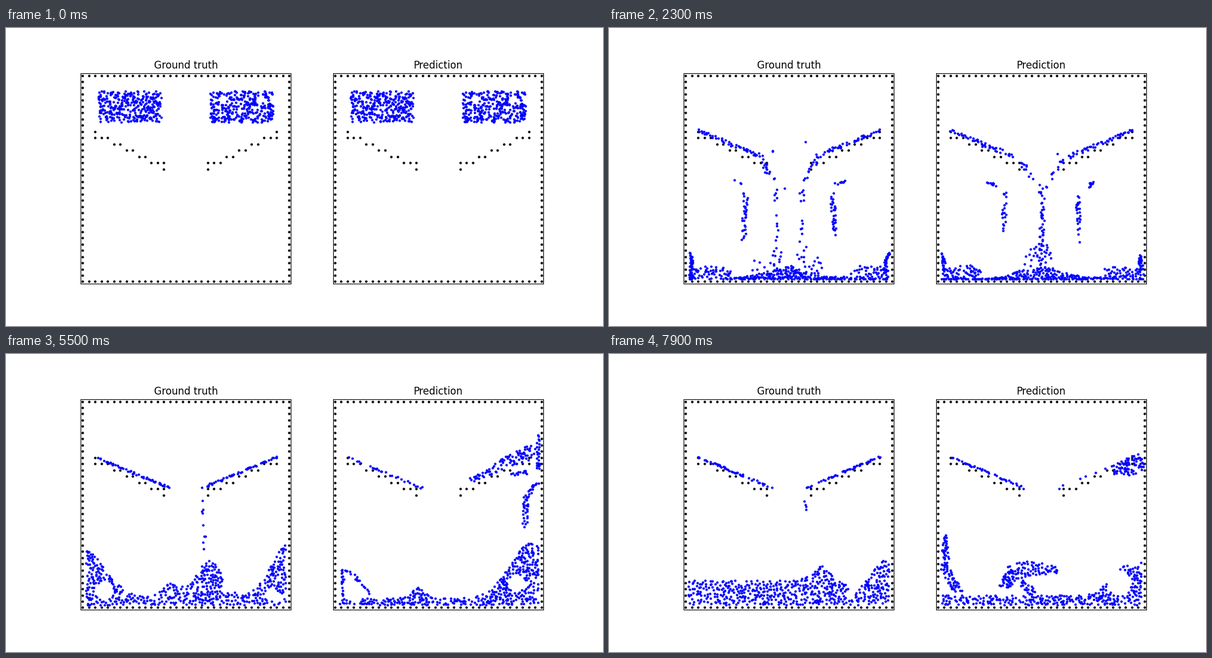
These frames come from a looping animation (1000 px wide and 500 px high, 8 s). A matplotlib script:

```python
import numpy as np
import matplotlib.pyplot as plt
from matplotlib.animation import FuncAnimation

# Lengths are in grid cells, y points up from the bottom of the box.
N = 640                 # water particles per panel
BOX = 33.6
MID = BOX / 2
GRAVITY = 52            # cells per second squared
LIP = 14.3              # where water leaves the left ramp
STEP = 100              # ms per frame
FRAMES = 80
rng = np.random.default_rng(7)


def surface(x):
    """Height of the water film on the two ramps."""
    return 18.2 + 0.425 * np.abs(x - MID)


# A shape is a particle share and the two edges of a strip.
def band(n, *v):
    """Stroke through x, y, width triples."""
    p = np.reshape(v, (-1, 3)).astype(float)
    d = np.gradient(p[:, :2], axis=0)
    d /= np.hypot(d[:, 0], d[:, 1])[:, None]
    off = np.c_[-d[:, 1], d[:, 0]] * p[:, 2:] / 2
    return n, p[:, :2] - off, p[:, :2] + off


def blob(n, x, y, r):
    return band(n, x - r, y, r, x, y, 2 * r, x + r, y, r)


def pool(n, base, *bumps):
    """Water on the floor, raised by bumps of centre, height, width."""
    x = np.linspace(0.8, BOX - 0.8, 80)
    top = base + sum(h * np.exp(-((x - c) / w) ** 2) for c, h, w in bumps)
    return n, np.c_[x, 0 * x + 0.75], np.c_[x, top]


def film(n, w):
    """Water on the left ramp, thicker towards the lip."""
    return band(n, 2.2, surface(2.2) + 0.2 * w, 0.5 * w, 14.2, surface(14.2) + 0.35 * w, w)


def mirror(p):
    return np.c_[BOX - p[:, 0], p[:, 1]]


def pair(shape):
    n, a, b = shape
    return shape, (n, mirror(a), mirror(b))


def sample(a, b, m):
    wide = np.hypot(*(a - b).T)
    area = np.hypot(*np.diff(a + b, axis=0).T) * (wide[1:] + wide[:-1] + 0.1)
    i = rng.choice(len(area), m, p=area / area.sum())
    t, s = rng.random((m, 1)), rng.random((m, 1))
    return (a[i] * (1 - t) + a[i + 1] * t) * (1 - s) + (b[i] * (1 - t) + b[i + 1] * t) * s


def cloud(*shapes, holes=()):
    """Scatter N particles over the shapes, keeping round holes free."""
    pts = np.full((N, 2), -99.0)
    share = np.cumsum([n for n, _, _ in shapes])
    ends = np.rint(share / share[-1] * N).astype(int)
    k = 0
    for (_, a, b), end in zip(shapes, ends):
        while k < end:
            c = sample(a, b, 8)
            for x, y, r in holes:
                c = c[np.hypot(c[:, 0] - x, c[:, 1] - y) > r]
            c = c[:2]
            if len(c):
                gap = ((c[:, None] - pts[None]) ** 2).sum(2).min(1)
                pts[k] = c[gap.argmax()]
                k += 1
    return pts


half = rng.uniform((2.8, 25.8), (12.9, 30.8), (2, N // 2, 2))


def drop(t):
    """Two blocks fall, pile up on the ramps and slide to the lips."""
    sides = []
    for p in half:
        x, y = p.T
        pile = 0.55 * (y - 25.7)
        land = np.sqrt(2 * np.maximum(y - surface(x) - pile, 0) / GRAVITY)
        slide = x + 0.18 * GRAVITY * np.maximum(t - land, 0) ** 2
        over = np.maximum(slide - LIP, 0)
        wet = surface(np.minimum(slide, LIP)) + pile - 6 * over
        y = np.where(t < land, y - GRAVITY * t * t / 2, wet)
        sides.append(np.c_[slide - over / 2, y])
    return np.r_[sides[0], mirror(sides[1])]


def spread(u, x):
    """Streams at x feed a pool that starts to climb the walls."""
    return cloud(*pair(film(65 - 20 * u, 1.1 - 0.5 * u)),
                 *pair(band(60 - 32 * u, x, 18.5, 1, x - 0.2, 3, 1.5 - 0.5 * u)),
                 pool(330 - 80 * u, 1.6 + 0.3 * u, (MID, 2.5 - u, 3)),
                 *pair(band(24 + 86 * u, 1.3, 4 + 7 * u, 0.5, 1.6, 1, 0.6 + u)))


def route(p):
    """Stretch the films upstream so water leaves the ramps by the lips."""
    x, y = p.T
    arm = np.abs(x - MID)
    wet = (np.abs(y - surface(x)) < 2.5) & (arm < 14.9)
    return np.c_[np.where(wet, MID + 0.3 * (x - MID), x), y + wet * arm]


def match(p, q):
    """Reorder q so that every particle of p gets a near partner."""
    start, goal = route(p), route(q)
    order = np.arange(N)
    for _ in range(2500):
        i, j = rng.permutation(N).reshape(2, -1)
        gain = (start[i] - start[j]) * (goal[order[i]] - goal[order[j]])
        swap = gain.sum(1) < 0
        i, j = i[swap], j[swap]
        order[i], order[j] = order[j], order[i]
    return q[order]


class Flow:
    """Smooth particle paths through timed clouds."""

    def __init__(self, keys):
        self.t = np.array(list(keys), float)
        path = []
        for pts in keys.values():
            path.append(match(path[-1], pts) if path else pts)
        self.p = np.array(path)
        self.v = 0.7 * np.gradient(self.p, self.t, axis=0)
        self.v[0] = 0

    def at(self, t):
        k = min(np.searchsorted(self.t, t, "right") - 1, len(self.t) - 2)
        h = self.t[k + 1] - self.t[k]
        u = (t - self.t[k]) / h
        e = u * u * (3 - 2 * u)
        p = (self.p[k] * (1 - e) + self.p[k + 1] * e
             + h * u * (1 - u) * ((1 - u) * self.v[k] - u * self.v[k + 1]))
        return np.clip(p, 0.7, BOX - 0.5)


start = {t: drop(t / 1000) for t in (0, 300, 600, 900)}

truth = start | {
    1500: cloud(
        *pair(film(155, 2.4)),
        band(130, 15.4, 19, 1.7, 14.8, 12.3, 1.3, 14.8, 8.9, 2.2, 14.6, 5.4, 1.2),
        band(150, 18.4, 19, 1.8, 17.8, 11.3, 1.5, 15.6, 6.4, 1.6, 13.7, 0.9, 0.6),
        *pair(band(23, 1.2, 21, 0.2, 1.3, 12.7, 0.3))),
    2100: spread(0, 14.6),
    2600: spread(1, 14.4),
    3100: cloud(
        *pair(film(62, 0.6)),
        band(11, 8.2, 18, 0.5, 10.5, 18.6, 0.4),
        band(20, 14.1, 16.3, 0.3, 14.4, 10.3, 0.3),
        blob(20, 14.2, 7.6, 1), blob(24, 19.6, 8.8, 1.2), blob(34, 3.7, 11.5, 1.3),
        band(34, 24.6, 9.6, 1, 26, 8.8, 0.9, 30.5, 9.4, 0.4),
        band(130, 2, 14.2, 0.6, 1.3, 8, 1.2, 2, 1.5, 2),
        band(100, 31.7, 10.8, 1.3, 32.3, 5, 1.4, 31.8, 1.5, 1.8),
        pool(150, 1.8, (16, 1.8, 1), (22.5, 0.5, 2))),
    4200: cloud(
        *pair(film(52, 0.5)),
        band(95, 1.4, 13, 1, 1.3, 7, 1.2, 1.3, 1, 1),
        band(130, 1.9, 11.3, 2, 5.5, 9, 2, 9.5, 2.5, 2),
        band(36, 13.5, 7.8, 0.7, 12.3, 2.4, 2),
        band(140, 31.6, 16, 0.8, 31.5, 10, 2.6, 32.3, 1.5, 0.9),
        band(20, 29.6, 12, 0.8, 27.9, 7, 0.8),
        pool(150, 1.6, (20.5, 1.8, 2.8))),
    5500: cloud(
        *pair(film(48, 0.4)),
        band(8, 19.3, 18, 0.3, 19.8, 9.5, 0.8),
        pool(520, 1.9, (0, 8, 5.3), (14.5, 2.3, 2.2), (20.5, 6, 2.8), (BOX, 9, 4.3)),
        holes=((3.8, 3, 1.5), (23.7, 4, 1.3), (30.4, 2.4, 1.1))),
    6400: cloud(
        *pair(film(42, 0.4)),
        pool(550, 2, (0, 4.9, 4), (11.5, 2.5, 3), (15.8, 4, 1.4), (24, 6, 2.8), (BOX, 5.5, 3.8)),
        holes=((24.5, 4.2, 1.7), (9.3, 2.6, 0.7))),
    7900: cloud(
        *pair(film(42, 0.4)),
        band(4, 19.3, 18, 0.3, 19.6, 15.7, 0.3),
        pool(550, 4.7, (22, 2.3, 2), (27.3, -1.8, 1.5), (32, 3.2, 2)),
        holes=((26.6, 2.5, 0.9),)),
}

prediction = start | {
    1500: cloud(
        *pair(film(170, 2.5)),
        band(270, 17.4, 19.7, 4, 17.6, 15.5, 4, 18.5, 7.5, 2.4, 18.2, 2.5, 0.5),
        band(30, 1.9, 25, 0.7, 1.3, 18.6, 0.4)),
    2100: spread(0, 16.4),
    2600: spread(1, 16.5),
    3100: cloud(
        *pair(film(42, 0.5)),
        band(30, 14.2, 19.5, 0.5, 15.5, 17.5, 0.7),
        band(38, 16.2, 16, 1, 17.3, 10.5, 0.8), band(55, 17, 8, 0.9, 16.8, 2, 2.5),
        band(10, 1.7, 21.5, 0.3, 1.8, 17, 0.3),
        band(100, 3.6, 16, 1.4, 6, 11, 1.3, 3, 5.5, 1.3),
        band(50, 2.3, 7.5, 1.5, 2, 1.5, 2.2),
        band(175, 32.3, 25.2, 0.4, 32.5, 16, 1.3, 32, 2.7, 1.6),
        pool(190, 1.8, (16.8, 1, 1), (31, 1.3, 4))),
    4200: cloud(
        *pair(film(20, 0.5)),
        band(310, 32.2, 30.2, 0.4, 32.3, 22, 2, 31.9, 9, 2.2, 31.8, 2, 2),
        band(52, 30.5, 28.3, 0.5, 30, 23, 2.4, 29.5, 18.4, 2.5),
        blob(15, 2.6, 17.5, 0.7),
        band(26, 7.7, 15.3, 0.5, 9.5, 14.9, 1.3, 13.7, 14.2, 0.6),
        band(80, 14, 13.5, 1.2, 13, 10, 1.7, 16.5, 1.6, 1),
        band(90, 12.5, 7, 1.5, 7, 6.8, 0.9, 1.8, 7.3, 1.5),
        band(34, 1.7, 7, 1, 1.8, 2, 1.1),
        band(26, 10.8, 5.5, 0.8, 16, 3.5, 0.8),
        pool(75, 1.4, (31.5, 0.8, 1))),
    5500: cloud(
        film(28, 0.4),
        band(92, 21.7, 20.6, 0.7, 27.9, 23.7, 1.8, 32.5, 25.5, 2.8),
        band(26, 32.7, 28, 0.5, 32.8, 22.5, 0.6), band(13, 27.9, 21.5, 0.4, 30.9, 22, 0.7),
        band(45, 32.7, 20.5, 0.7, 30.8, 18, 0.8, 30.6, 13, 0.8),
        band(38, 1.6, 1.5, 0.5, 1.5, 6.3, 0.4, 2.6, 6.2, 0.5, 6, 2.6, 0.5),
        pool(430, 1.8, (13.5, 1.9, 1.5), (31.8, 9, 5)),
        holes=((29.3, 4.3, 1.4), (3.5, 2, 1))),
    6400: cloud(
        film(26, 0.4),
        band(95, 14, 18.5, 0.8, 15.4, 17.7, 1.9, 19.3, 20.4, 1.1, 27.7, 23.3, 0.7),
        band(56, 28.2, 22.3, 1.4, 32.9, 24.3, 3), band(18, 33, 22, 0.3, 32.8, 12, 0.6),
        band(50, 16, 5.5, 1.8, 22.8, 8.9, 0.6),
        pool(430, 1.5, (2.3, 3.8, 1.8), (16.5, 3.6, 2.5), (32.6, 9.8, 5.3)),
        holes=((29, 4.3, 1.8), (20.5, 4.6, 1.4), (6, 1.9, 0.6))),
    7900: cloud(
        film(38, 0.4), mirror_film := pair(film(10, 0.4))[1],
        band(70, 28.2, 22.3, 1.4, 30.9, 22.8, 3, 33.1, 24, 2.7),
        band(80, 1.4, 12.3, 0.4, 1.5, 6.5, 1.6, 3.6, 2.7, 1.4),
        band(110, 10.8, 3.5, 1.6, 12, 6, 3, 15, 6.6, 2.5, 19.5, 6.3, 1),
        band(22, 13.5, 4.3, 1.2, 15.7, 2.5, 1.3),
        pool(310, 2.3, (30.5, 4.8, 3.5), (33.2, 3, 1)),
        holes=((29.2, 4.2, 2),)),
}

# Fixed dots: the box and two stepped ramps.
ends = (0, 33)
dots = [(i, j) for i in range(34) for j in range(34) if i in ends or j in ends]
steps = [(i, 23 - min(max((i - 3) // 2, 0), 4)) for i in range(2, 14)] + [(2, 24), (13, 18)]
dots = np.array(dots + steps + [(33 - i, j) for i, j in steps]) + 0.3

fig, axes = plt.subplots(1, 2, figsize=(10, 5), dpi=100)
panels = []
for ax, title, keys in zip(axes, ("Ground truth", "Prediction"), (truth, prediction)):
    ax.set(title=title, xlim=(0, BOX), ylim=(0, BOX), xticks=[], yticks=[], aspect=1)
    ax.plot(*dots.T, "o", ms=2, color="black")
    water, = ax.plot([], [], "o", ms=2, color="blue")
    panels.append((water, Flow(keys)))


def draw(i):
    for water, flow in panels:
        water.set_data(*flow.at(i * STEP).T)
    return [water for water, _ in panels]


anim = FuncAnimation(fig, draw, frames=FRAMES, interval=STEP, repeat=True, repeat_delay=0)
plt.show()
```
